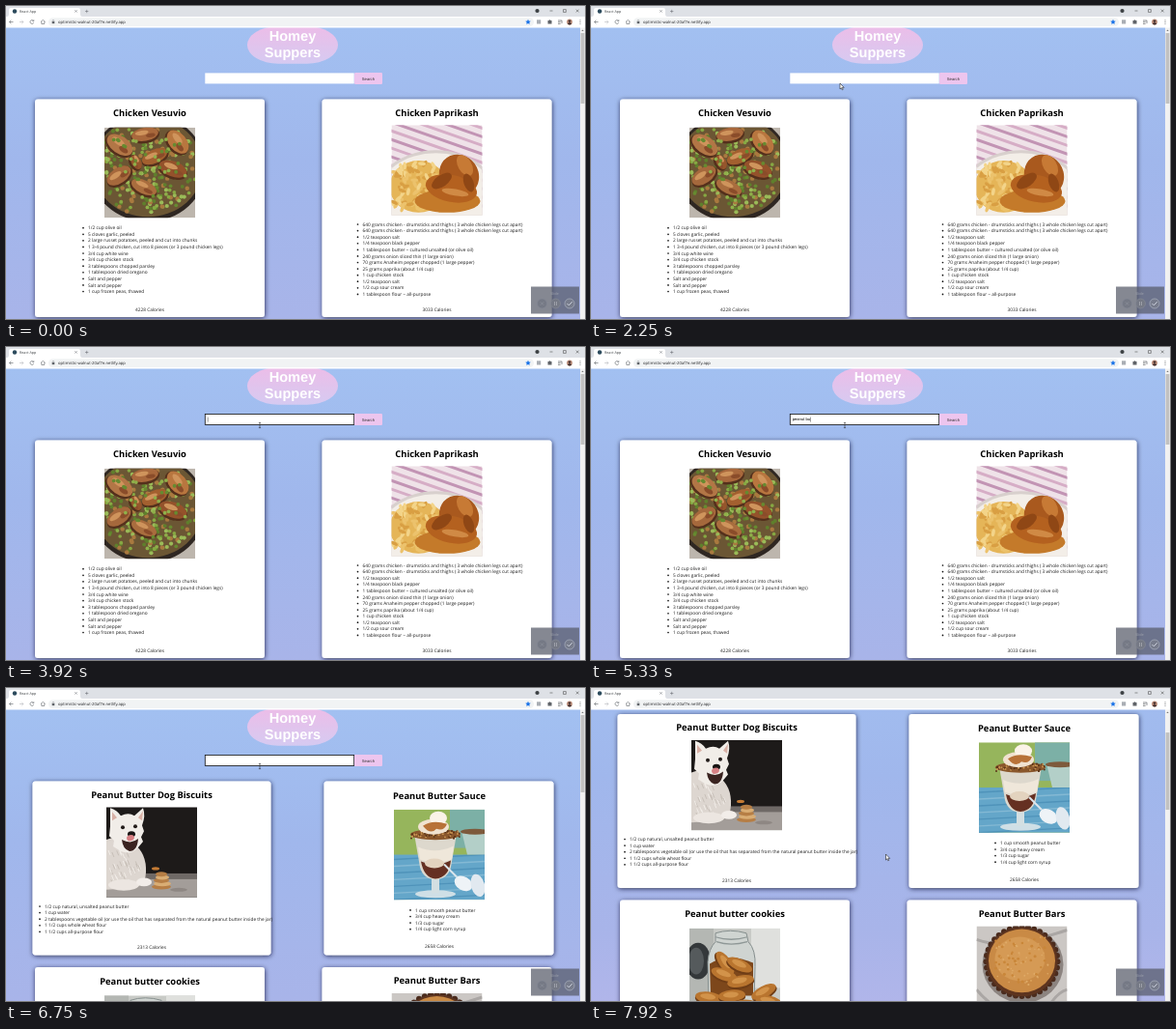
These frames come from a looping animation (600 px wide and 324 px high, 8 s). An HTML page:

```html
<!DOCTYPE html>
<html lang="en">
<head>
<meta charset="utf-8">
<title>Recipe search</title>
<style>
html, body { margin: 0; width: 100%; height: 100%; overflow: hidden; background: #fff; }
svg { display: block; width: 100vw; height: 100vh; }
text { font-family: "Open Sans", "Noto Sans", sans-serif; text-rendering: geometricPrecision; white-space: pre; }
.arial { font-family: "Liberation Sans", Arial, sans-serif; }
.h { font-size: 9.4px; font-weight: 700; text-anchor: middle; }
.li { font-size: 4.78px; fill: #1c1c1c; }
.mid { text-anchor: middle; }
</style>
</head>
<body>
<svg id="stage" viewBox="0 0 600 324"></svg>
<script>
const LOOP = 8000, FPS = 12;
const QUERY = 'peanut butter';

// drawing helpers
const rect = (x, y, w, h, fill, more = '') => `<rect x="${x}" y="${y}" width="${w}" height="${h}" fill="${fill}" ${more}/>`;
const oval = (x, y, rx, ry, fill, more = '') => `<ellipse cx="${x}" cy="${y}" rx="${rx}" ry="${ry}" fill="${fill}" ${more}/>`;
const dot = (x, y, r, fill, more) => oval(x, y, r, r, fill, more);
const path = (d, fill, more = '') => `<path d="${d}" fill="${fill}" ${more}/>`;
const line = (d, color, w = 0.6) => path(d, 'none', `stroke="${color}" stroke-width="${w}"`);
const text = (x, y, s, cls, more = '') => `<text x="${x}" y="${y}" class="${cls}" ${more}>${s}</text>`;
const turn = (a, x, y) => `transform="rotate(${a} ${x} ${y})"`;

function random(seed) {
  return () => (seed = (seed * 16807) % 2147483647) / 2147483647;
}

function scatter(seed, n, area, draw) {
  const r = random(seed);
  let out = '';
  for (let i = 0; i < n; i++) out += draw(area[0] + r() * area[2], area[1] + r() * area[3], r());
  return out;
}

// pictures, each in a 94 x 94 box
function vesuvio() {
  const piece = (x, y, rx, ry, a, c) =>
    oval(x, y + 1.5, rx + 1, ry + 1, '#54301c', turn(a, x, y)) + oval(x, y, rx, ry, c, turn(a, x, y)) +
    oval(x - 3, y - 2, rx * 0.5, ry * 0.35, '#cf945c', turn(a, x, y)) + oval(x + rx * 0.4, y + 2, rx * 0.35, ry * 0.3, '#8a4c2a', turn(a, x, y));
  return rect(0, 0, 94, 94, '#bdb6ad') + oval(45, 42, 60, 56, '#2f2722') + oval(45, 41, 57, 52, '#6b5634') +
    scatter(41, 230, [0, 0, 94, 88], (x, y, k) =>
      Math.hypot(x - 45, y - 40) < 52 ? dot(x, y, 1.8 + k * 0.5, ['#86a843', '#5f7f2c', '#9abb58', '#a9793f'][k * 4 | 0]) : '') +
    piece(16, 18, 15, 9, 35, '#b27646') + piece(42, 7, 14, 7, -10, '#a8683c') +
    piece(76, 15, 14, 9, 50, '#b8763f') + piece(52, 30, 14, 7, -25, '#a3602f') +
    piece(15, 50, 14, 8, -35, '#a5683c') + piece(71, 43, 15, 8, 20, '#94522b') +
    piece(41, 62, 14, 7, 25, '#a96d3e') + piece(33, 36, 8, 5, 60, '#96562c') +
    scatter(77, 80, [4, 12, 82, 72], (x, y, k) => k > 0.4 ? dot(x, y, 1.9, k > 0.7 ? '#8fb04a' : '#678a30') : '');
}

function paprikash() {
  let cloth = '';
  for (let i = 0; i < 11; i++)
    cloth += line(`M-20 ${-46 + i * 9} l125 44`, i % 2 ? '#d6adc6' : '#c294b4', 3);
  return rect(0, 0, 94, 94, '#efe2e8') + cloth + oval(46, 72, 62, 46, '#d8d0cd') + oval(46, 72, 59, 43, '#f3eee8') +
    oval(28, 64, 30, 27, '#e5b558') +
    scatter(9, 90, [2, 40, 54, 48], (x, y, k) => oval(x, y, 4, 1.8, ['#f3d489', '#d99f43', '#ecc26c'][k * 3 | 0], turn(k * 900, x, y))) +
    oval(58, 79, 34, 12, '#c47a2a') + oval(70, 52, 20, 22, '#a9591e', turn(-35, 70, 52)) +
    oval(62, 66, 27, 14, '#b4611f', turn(12, 62, 66)) + oval(76, 42, 7, 12, '#c77a35', turn(-30, 76, 42)) +
    oval(52, 58, 12, 6, '#8f4715', turn(-35, 52, 58)) + oval(66, 70, 14, 3.5, '#d08a45', turn(10, 66, 70)) +
    oval(80, 60, 5, 10, '#8f4715', turn(-20, 80, 60));
}

function dog() {
  return rect(0, 0, 94, 94, '#1d1a19') + rect(0, 70, 94, 24, '#a39d99') + rect(0, 69, 94, 6, '#6f6966') +
    path('M0 34 Q12 28 28 38 Q42 48 41 68 Q41 80 30 84 L0 86Z', '#ddd6d0') +
    path('M4 20 L4 1 Q11 3 15 9 Q23 5 29 9 L38 1 Q41 9 37 19 L39 25 L36 31 L38 36 L33 42 Q26 50 15 46 L7 41 L8 35 L3 30Z', '#f1ede8') +
    path('M6 14 L6 5 L11 11Z', '#d9b1a6') + path('M33 11 L38 4 L37 14Z', '#d9b1a6') +
    scatter(23, 40, [2, 44, 32, 34], (x, y, k) => line(`M${x} ${y} l2 5`, k > 0.5 ? '#c5bdb6' : '#f3efea', 0.9)) +
    dot(17, 21, 2, '#221c1a') + dot(30, 20, 2, '#221c1a') + oval(26, 28, 4, 3, '#181413') +
    path('M16 34 Q26 39 33 33 Q32 46 24 46 Q17 44 16 34Z', '#3a2320') + oval(25, 32, 4, 3, '#d77f83', turn(-20, 25, 32)) +
    oval(18, 81, 16, 6, '#ece6e1') + oval(39, 78, 8, 4.5, '#f2ede9') +
    [0, 1, 2, 3, 4].map(i => oval(57 + i % 2, 83 - i * 3.3, 10 - i, 2.6, i % 2 ? '#d9ad74' : '#b67e45')).join('') +
    oval(75, 86, 9, 2, '#8e8783') + oval(51, 64, 4, 1.6, '#c57b34');
}

function sundae() {
  let weave = '';
  for (let i = 0; i < 7; i++) weave += line(`M0 ${52 + i * 7} L94 ${47 + i * 7}`, i % 2 ? '#84b9d4' : '#4f93ba', 1.4);
  return rect(0, 0, 94, 94, '#96b55c') + rect(58, 0, 36, 40, '#7cb0a6') + rect(0, 47, 94, 47, '#64a6c9') + weave +
    path('M70 22 h24 v25 h-18Z', '#b3cfc8') + oval(84, 23, 15, 3, '#7d5a3c') +
    oval(43, 88, 21, 4, '#cfdfe6') + rect(39, 70, 8, 17, '#d3dfe2') +
    path('M21 25 H65 L59 60 Q56 72 43 73 Q30 72 27 60Z', '#ddd8cd') +
    path('M25 39 Q43 47 62 38 L60 52 Q43 58 27 52Z', '#efe7da') +
    path('M28 54 Q43 61 59 53 Q57 71 43 72 Q31 71 28 54Z', '#653022') + oval(42, 56, 10, 5, '#e3d3bf') +
    oval(43, 26, 26, 5.5, '#8a572c') + scatter(15, 60, [18, 22, 50, 8], (x, y, k) => dot(x, y, 1, k > 0.5 ? '#c89351' : '#593317')) +
    oval(41, 18, 16, 8, '#f0e2d0') + oval(46, 9, 9, 7, '#fbf3e8') + path('M30 17 Q40 10 55 15 Q52 23 44 20 Q38 27 30 17Z', '#b87238') +
    oval(72, 77, 10, 7, '#eef3f7', turn(30, 72, 77)) + oval(87, 79, 7, 12, '#e1e9f0', turn(-15, 87, 79)) +
    line('M65 70 L52 57', '#dce6ec', 2);
}

function jar() {
  const cookie = (x, y, a) => oval(x, y + 2, 14, 6, '#6f3d16', turn(a, x, y)) + oval(x, y, 14, 6, '#b9752f', turn(a, x, y)) +
    oval(x - 1, y - 1, 8, 3, '#d2934a', turn(a, x, y));
  return rect(0, 0, 94, 94, '#c8cac6') + rect(0, 0, 25, 94, '#b4b7b3') + rect(64, 0, 30, 62, '#dfe0dd') +
    oval(9, 34, 13, 19, '#34383a') + oval(7, 34, 8, 14, '#555a5c') +
    path('M27 5 Q42 0 59 5 L61 14 Q69 22 68 40 L67 78 H20 L19 35 Q20 21 27 14Z', '#cfd4d1', 'stroke="#858e8d"') +
    line('M27 9 Q43 14 60 9 M28 14 Q43 19 60 14', '#8f9897', 1.3) + path('M21 37 Q40 24 66 36 L66 70 H22Z', '#7d471b') +
    cookie(37, 36, 55) + cookie(52, 38, 25) + cookie(36, 48, 20) + cookie(53, 55, -12) +
    cookie(20, 72, 8) + cookie(44, 70, -5) + cookie(77, 66, -28) + cookie(82, 76, 12) + cookie(58, 80, 0) + cookie(26, 85, 5);
}

function tart() {
  let crust = '';
  for (let i = 0; i < 36; i++) {
    const a = i * Math.PI / 18;
    crust += dot(47 + 37 * Math.cos(a), 37 + 36 * Math.sin(a), 3, '#4a2b1d');
  }
  return rect(0, 0, 94, 94, '#cbc7c4') + line('M0 14 Q30 26 94 4 M0 66 Q20 90 45 94 M70 94 Q80 70 94 66', '#aaa6a4', 3) +
    oval(48, 40, 42, 40, '#8c8480') + crust + oval(47, 37, 37, 36, '#5d341f') + oval(47, 36, 34.5, 33, '#c98a45') +
    oval(45, 34, 26, 23, '#d59a55') + scatter(5, 90, [20, 11, 54, 50], (x, y, k) => dot(x, y, 0.6 + k, k > 0.5 ? '#c98639' : '#dfab68'));
}

function photo(x, y, art) {
  return `<svg x="${x}" y="${y}" width="94" height="93.5" viewBox="0 0 94 94" preserveAspectRatio="none">${art()}</svg>`;
}

// lx, ly: first baseline of the list
function card({ x, y, w, h, cx, ty, px, py, name, art, lx, ly, items = [], kcal, ky }) {
  const entry = (s, i) => dot(lx - 5, ly + i * 6.58 - 1.6, 0.85, '#111') + text(lx, ly + i * 6.58, s, 'li');
  return rect(x, y, w, h, '#fff', 'rx="3" filter="url(#shadow)"') + text(cx, ty, name, 'h') + photo(px, py, art) +
    items.map(entry).join('') + (kcal ? text(cx, ky, kcal + ' Calories', 'li mid') : '');
}

const before = [
  { x: 30, y: 96.5, w: 238, h: 225.5, cx: 149, ty: 114.4, px: 102, py: 125.8, name: 'Chicken Vesuvio', art: vesuvio, lx: 85, ly: 231.3, kcal: 4228, ky: 315.5,
    items: ['1/2 cup olive oil', '5 cloves garlic, peeled', '2 large russet potatoes, peeled and cut into chunks',
      '1 3-4 pound chicken, cut into 8 pieces (or 3 pound chicken legs)', '3/4 cup white wine', '3/4 cup chicken stock',
      '3 tablespoons chopped parsley', '1 tablespoon dried oregano', 'Salt and pepper', 'Salt and pepper', '1 cup frozen peas, thawed'] },
  { x: 327.5, y: 96.5, w: 238, h: 225.5, cx: 446.5, ty: 113.5, px: 399.5, py: 123.3, name: 'Chicken Paprikash', art: paprikash, lx: 369.5, ly: 227.6, kcal: 3033, ky: 315.8,
    items: [...Array(2).fill('640 grams chicken - drumsticks and thighs ( 3 whole chicken legs cut apart)'),
      '1/2 teaspoon salt', '1/4 teaspoon black pepper', '1 tablespoon butter – cultured unsalted (or olive oil)',
      '240 grams onion sliced thin (1 large onion)', '70 grams Anaheim pepper chopped (1 large pepper)',
      '25 grams paprika (about 1/4 cup)', '1 cup chicken stock', '1/2 teaspoon salt', '1/2 cup sour cream', '1 tablespoon flour – all-purpose'] }
];

const after = [
  { x: 27.5, y: 96.5, w: 247, h: 180, cx: 151, ty: 113.5, px: 104, py: 123.3, name: 'Peanut Butter Dog Biscuits', art: dog, lx: 40, ly: 227.6, kcal: 2313, ky: 270,
    items: ['1/2 cup natural, unsalted peanut butter', '1 cup water',
      '2 tablespoons vegetable oil (or use the oil that has separated from the natural peanut butter inside the jar)',
      '1 1/2 cups whole wheat flour', '1 1/2 cups all-purpose flour'] },
  { x: 329.5, y: 96.5, w: 238, h: 180, cx: 449, ty: 114.5, px: 402, py: 125.8, name: 'Peanut Butter Sauce', art: sundae, lx: 424, ly: 231.5, kcal: 2658, ky: 269.3,
    items: ['1 cup smooth peanut butter', '3/4 cup heavy cream', '1/3 cup sugar', '1/4 cup light corn syrup'] },
  { x: 30, y: 289, w: 238, h: 190, cx: 149, ty: 306.8, px: 102, py: 318.3, name: 'Peanut butter cookies', art: jar },
  { x: 327.5, y: 289, w: 238, h: 190, cx: 446.5, ty: 306.1, px: 399.5, py: 316, name: 'Peanut Butter Bars', art: tart }
];

function browser() {
  const grey = '#5f6368';
  return rect(0, 0, 600, 11, '#dee1e6') + path('M1 11 Q3 11 3 8 V4 Q3 2 5 2 H75 Q77 2 77 4 V8 Q77 11 79 11Z', '#fff') +
    dot(9, 5.5, 2.2, '#2b4a5c') + text(14, 7, 'React App', '', 'font-size="3.7" fill="#3c4043"') +
    line('M71.3 4.2 l2.4 2.4 m0 -2.4 l-2.4 2.4 M82 5.5 h3.4 M83.7 3.8 v3.4', grey, 0.5) + dot(550.5, 5, 2.1, '#3c4043') +
    line('M563.5 5 h3 M577.5 3.6 h2.8 v2.8 h-2.8z M590.8 3.6 l2.8 2.8 m0 -2.8 l-2.8 2.8', '#333', 0.5) +
    rect(0, 11, 600, 11.5, '#fff') + rect(44, 12.3, 503, 8.6, '#f1f3f4', 'rx="4.3"') +
    line('M7.5 16.5 h-4 m1.8 -1.8 l-1.8 1.8 l1.8 1.8', grey) + line('M14 16.5 h4 m-1.8 -1.8 l1.8 1.8 l-1.8 1.8', '#b5b8bc') +
    line('M28.4 15.3 a1.9 1.9 0 1 0 .3 1.8 M28.8 14.2 v1.5 h-1.5', grey) + line('M36 16.4 l2.3 -2 l2.3 2 M36.8 16 v2.5 h3 v-2.5', grey) +
    rect(47.7, 16, 2.6, 2.2, grey) + line('M48.2 16 v-.7 a.8 .8 0 0 1 1.6 0 v.7', grey, 0.4) +
    text(54, 18, 'optimistic-walnut-20af7e.netlify.app', '', 'font-size="4.2" fill="#202124"') +
    path('M541 13.8 l.8 1.8 l2 .2 l-1.5 1.3 l.4 1.9 l-1.7 -1 l-1.7 1 l.4 -1.9 l-1.5 -1.3 l2 -.2z', '#1a73e8') +
    rect(550, 14.3, 4.2, 4.2, '#a9aeb4') + path('M561.5 15 h1.2 a.8 .8 0 0 1 1.6 0 h1.2 v3.6 h-4z', grey) +
    line('M572 15 h4 M572 16.7 h2.6 M572 18.4 h2.6 M576 15 v3', grey, 0.7) +
    dot(584, 16.5, 2.9, '#b98b78') + dot(584, 15.6, 1.2, '#3d2b2b') + path('M581.9 18.5 q2.1 -3 4.2 0 q-2 1.8 -4.2 0', '#3d2b2b') +
    [14.8, 16.5, 18.2].map(y => dot(595, y, 0.5, grey)).join('');
}

function recorder() {
  return rect(544, 290.5, 50, 28, '#565b68', 'opacity=".72"') + text(568.5, 299, 'Slide', 'mid', 'font-size="3.8" fill="#a0a4ae"') +
    [555.5, 569.5, 584].map((x, i) => dot(x, 308, 5, i > 1 ? '#777c8c' : '#757985', `stroke="${i > 1 ? '#aab0bf' : '#858995'}" stroke-width=".7"`)).join('') +
    line('M553.8 306.3 l3.4 3.4 m0 -3.4 l-3.4 3.4', '#92959f') + line('M568.5 306 v4 M570.5 306 v4', '#a6a9b2', 0.8) + line('M581.5 308 l1.8 1.8 l3.4 -3.6', '#d5dae6', 0.9);
}

const stage = document.getElementById('stage');
stage.innerHTML = `<defs>
  <linearGradient id="sky" gradientUnits="userSpaceOnUse" x1="0" y1="22" x2="0" y2="480">
    <stop offset="0" stop-color="#a2c0f1"/><stop offset=".3" stop-color="#a0b7ec"/><stop offset=".65" stop-color="#a8b4e9"/><stop offset="1" stop-color="#bab7eb"/>
  </linearGradient>
  <linearGradient id="pink" x1="0" y1="0" x2="0" y2="1"><stop offset="0" stop-color="#ecbde8"/><stop offset="1" stop-color="#d6caf1"/></linearGradient>
  <filter id="shadow" x="-6%" y="-6%" width="112%" height="114%"><feDropShadow dx=".4" dy="1" stdDeviation="2.4" flood-color="#10142c" flood-opacity=".75"/></filter>
</defs>
<g id="page">${rect(0, 22, 600, 480, 'url(#sky)')}
  ${rect(250, 21, 94, 38.7, 'url(#pink)', 'rx="32" ry="19.3"')}
  ${['Homey', 'Suppers'].map((s, i) => text(297, 36 + i * 16.6, s, 'arial mid', 'font-size="14.6" font-weight="700" fill="#fff"')).join('')}
  ${rect(206.3, 69.4, 154.4, 11, '#fff', 'id="field" stroke-width=".8"')}
  ${rect(361, 69, 29, 12, '#edc5ee', 'rx="1.2"')}
  ${text(375.4, 76.5, 'Search', 'arial mid', 'font-size="4.17" fill="#333"')}
  ${text(208.7, 76.4, '', 'arial', 'id="typed" font-size="4.17"')}
  ${rect(0, 72.6, 0.4, 5, '#111', 'id="caret"')}
  <g id="before">${before.map(card).join('')}</g>
  <g id="after">${after.map(card).join('')}</g>
</g>
${rect(595, 22, 5, 302, '#f1f1f1')}${path('M596.3 26 l1.2 -1.6 l1.2 1.6z', '#777')}
${rect(595.6, 28, 3.8, 73, '#c1c1c1', 'id="thumb"')}
${browser()}${recorder()}
<g id="arrow">${path('M0 0 V6 L1.4 4.8 L2.3 6.8 L3.2 6.4 L2.3 4.4 H4.2Z', '#fff', 'stroke="#111" stroke-width=".55"')}</g>
<g id="beam">${line('M-1.1 -2.6 h2.2 M0 -2.6 v5.2 M-1.1 2.6 h2.2', '#222', 0.55)}</g>`;

const el = id => document.getElementById(id);
const show = (id, on) => el(id).setAttribute('visibility', on ? 'visible' : 'hidden');
const move = (id, x, y) => el(id).setAttribute('transform', `translate(${x} ${y})`);

// keys are [time, ...values], eased between neighbours
function track(keys, t) {
  const i = keys.findIndex(k => k[0] > t);
  if (i === 0) return keys[0].slice(1);
  if (i < 0) return keys[keys.length - 1].slice(1);
  const [a, b] = [keys[i - 1], keys[i]];
  const u = (t - a[0]) / (b[0] - a[0]), e = u * u * (3 - 2 * u);
  return a.slice(1).map((v, n) => v + (b[n + 1] - v) * e);
}

const POINTER = [[500, 322, 140], [950, 284, 98.5], [1400, 284, 98.5], [2200, 258, 80], [2420, 258, 80], [2750, 263, 81], [6900, 263, 81], [7330, 305.5, 172]];
const SCROLL = [[7330, 0], [7560, 31], [7900, 69.5]];
const FOCUS = 3400, TYPE = 4250, KEY = 125, SUBMIT = 6000, RESULT = 6330;

function render(t) {
  const [x, y] = track(POINTER, t), [scroll] = track(SCROLL, t);
  const inField = t > 2500 && t < 7000, found = t >= RESULT;
  move('page', 0, -scroll);
  el('thumb').setAttribute('y', 28 + scroll * 0.26);
  el('thumb').setAttribute('height', found ? 80 : 73);
  move('arrow', x, y);
  move('beam', x, y);
  show('arrow', t >= 500 && !inField);
  show('beam', inField);

  const focused = t >= FOCUS;
  el('field').setAttribute('stroke', focused ? '#111' : 'none');
  const n = t < TYPE || t >= SUBMIT ? 0 : Math.min(QUERY.length, 1 + Math.floor((t - TYPE) / KEY));
  const typed = el('typed');
  typed.textContent = QUERY.slice(0, n);
  const typing = n > 0 && n < QUERY.length;
  el('caret').setAttribute('x', 208.9 + (n ? typed.getComputedTextLength() : 0));
  // blinking restarts when the field is focused or cleared
  const since = t - (t < SUBMIT ? FOCUS : SUBMIT);
  show('caret', focused && (typing || since % 1060 < 530));

  show('before', !found);
  show('after', found);
}

const start = performance.now();
function tick() {
  const t = (performance.now() - start) % LOOP;
  render(Math.floor((t + 4) * FPS / 1000) * 1000 / FPS);
  requestAnimationFrame(tick);
}
tick();
</script>
</body>
</html>
```
